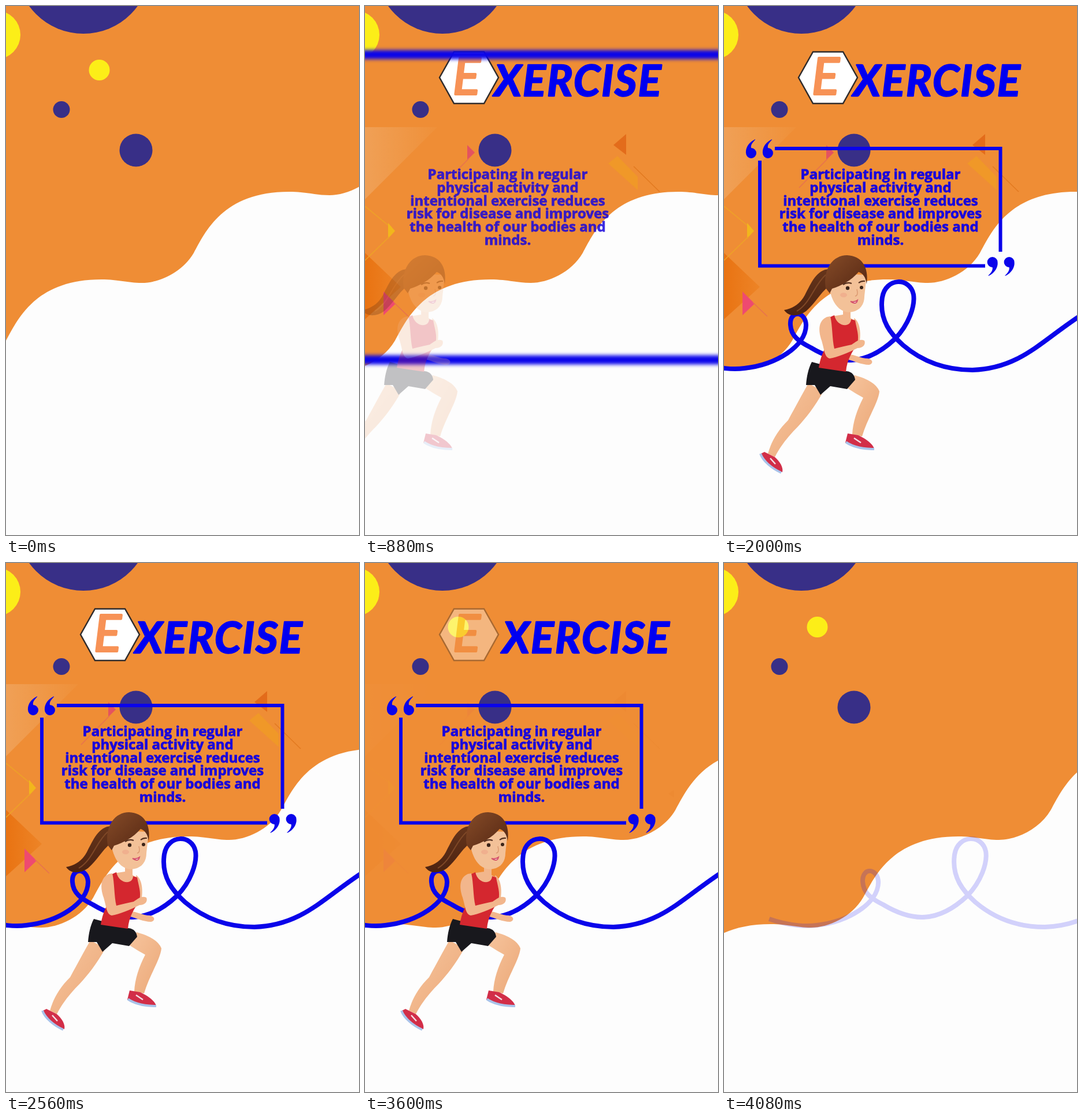
Recreate the animation shown at these times as an HTML page. Size 611 by 917 pixels, loop 4.16 s.

```html
<!DOCTYPE html>
<html lang="en">
<head>
<meta charset="utf-8">
<title>Exercise</title>
<style>
  html, body { margin: 0; width: 100%; height: 100%; overflow: hidden; background: #ef8d35; }
  svg { display: block; width: 100vw; height: 100vh; }
  .title { font: italic 700 74px Lato, sans-serif; letter-spacing: 2.3px; stroke-width: 2.5; stroke-linejoin: round; }
  .initial { font-size: 88px; font-weight: 400; stroke-width: 4; }
  .note { font: 700 24px "Open Sans", sans-serif; text-anchor: middle; fill: #1a08dc; stroke: #1a08dc; stroke-width: .8; }
  .line { fill: none; stroke: #0a04ea; }
  .skin { fill: #f2b68c; }
</style>
</head>
<body>
<svg viewBox="0 0 611 917">
  <defs>
    <linearGradient id="pale"><stop stop-color="#f0a056"/><stop offset="1" stop-color="#ef9039"/></linearGradient>
    <linearGradient id="deep"><stop stop-color="#e97312"/><stop offset="1" stop-color="#ed8427"/></linearGradient>
    <linearGradient id="hair" x2="1" y2="1"><stop stop-color="#854b28"/><stop offset="1" stop-color="#542612"/></linearGradient>
    <linearGradient id="tail" x2="0" y2="1"><stop stop-color="#66351b"/><stop offset="1" stop-color="#4d2311"/></linearGradient>
    <linearGradient id="leg" x2="1" y2="1"><stop stop-color="#f7c59e"/><stop offset="1" stop-color="#eba878"/></linearGradient>
    <g id="quotes" fill="#0a04ea">
      <path id="quote" d="M54 231c-11 5-17 15-16 24a9 9 0 1 0 9-9c-1-5 2-9 7-14z"/>
      <use href="#quote" x="29"/>
    </g>
  </defs>

  <rect width="611" height="917" fill="#ef8d35"/>

  <g id="shapes">
    <path fill="url(#pale)" d="M0 210H125L0 335z"/>
    <path fill="url(#deep)" d="M0 428L62 487L0 543z"/>
    <path fill="#e4535f" d="M177 241l13 13l-13 13z"/>
    <path fill="#ee4a70" d="M32 495l21 21l-21 20z"/>
    <path fill="#e36c1b" d="M452 222v36l-22-17z"/>
    <path fill="#f09828" d="M421 273l16-13l35 36v23z"/>
    <path fill="#f2b61c" d="M40 376l12 14l-12 13z"/>
    <path fill="#e5761e" d="M525 400l10-7v14z"/>
    <g fill="none" stroke-width="1.500">
      <path stroke="#e8714f" d="M180 264L130 315M50 514L75 538"/>
      <path stroke="#e2791f" d="M465 278L510 322"/>
      <path stroke="#eda426" d="M42 400L0 441M0 347L40 380"/>
    </g>
  </g>

  <path id="wave" fill="#fdfdfd"/>

  <g fill="#382f87">
    <circle cx="134" cy="-68" r="116"/>
    <circle cx="96" cy="179.500" r="14.500"/>
    <circle cx="225" cy="250" r="28.500"/>
  </g>
  <g fill="#fcee18">
    <circle cx="-17" cy="50" r="42"/>
    <circle cx="161.500" cy="111" r="18"/>
  </g>

  <g id="badge">
    <path fill="#fff" stroke="#302c2c" stroke-width="2.500" d="M129 124L154 79.500H206L231 124L206 169H154z"/>
    <text class="title initial" x="152" y="153" fill="#f79256" stroke="#f79256">E</text>
  </g>
  <text id="word" class="title" x="224" y="156" fill="#0000f0" stroke="#0000f0">XERCISE</text>

  <g id="frame">
    <path class="line" stroke-width="6" d="M88 247H478.500V426M62 268V450.500H452"/>
    <use href="#quotes"/>
    <use href="#quotes" transform="rotate(180 270.300 349.500)"/>
  </g>

  <text id="note" class="note"></text>

  <path id="ribbon" class="line" stroke-width="8" d="M-47 617C-10 630 20 630 35 628C90 622 142 590 142 553C141 528 113 527 115 553C116 572 130 582 150 592C200 622 245 625 296 577C320 552 331 520 328 500C322 470 280 470 274 505C268 545 290 570 310 588C350 622 395 631 430 631C520 628 555 572 640 522"/>

  <g id="runner">
    <!-- far arm and legs -->
    <path class="skin" d="M213 604C225 603 236 611 249 611C258 613 259 620 251 622C238 622 225 615 211 612z"/>
    <path class="skin" d="M225 541C235 547 237 565 235 580L228 582z"/>
    <path fill="url(#leg)" d="M210 660L226 640C245 645 264 654 269 668C267 688 248 715 239 746L222 743C223 722 230 700 241 679C232 674 222 668 210 660z"/>
    <path fill="url(#leg)" d="M146 654L172 668C157 695 141 715 128 729C112 745 98 762 88 782L76 776C82 755 92 737 111 718C124 694 136 672 146 654z"/>
    <!-- shoes -->
    <path fill="#d22e48" d="M214 741L232 744C243 749 256 757 260 767C245 768 225 767 210 757z"/>
    <path fill="#d22e48" d="M70 773L88 782C96 789 103 799 101 808L93 806C80 798 70 788 64 776z"/>
    <path fill="none" stroke="#a9c3ea" stroke-width="4" d="M211 756C225 766 245 768 260 768M63 776C68 789 82 801 99 809"/>
    <path fill="none" stroke="#f3dfe6" stroke-width="2.500" d="M225 749l12 8M80 784l9 10"/>
    <!-- body -->
    <path fill="#18181d" d="M152 617L212 633C222 634 226 640 227 648L213 664L184 659L167 674L157 657L142 657C143 643 146 628 152 617z"/>
    <path class="skin" d="M186 538L206 535V522H219V541L228 546L222 568H192z"/>
    <path fill="#d4272f" d="M182 540L191 536C195 556 219 559 220 543L227 545C230 562 234 570 231 585C222 600 213 612 211 634L164 627C167 605 176 592 183 575z"/>
    <path class="skin" d="M178 539C163 546 163 562 169 580C174 597 174 609 183 611C196 609 215 601 231 593C240 593 246 587 243 580C235 576 228 582 221 587C210 589 200 592 191 594C187 577 188 555 184 538z"/>
    <!-- head -->
    <path fill="url(#tail)" d="M182 456C160 457 151 480 140 501C132 516 120 524 104 527C112 539 128 539 142 529C160 513 167 496 184 484z"/>
    <path fill="none" stroke="#7f4827" stroke-width="2" d="M176 466C155 485 150 515 126 529"/>
    <path fill="#f3c198" d="M182 484C184 508 196 530 216 531C234 530 243 519 243 503L247 466L195 464z"/>
    <path fill="url(#hair)" d="M176 489C171 455 189 432 213 432C238 433 251 452 247 482C245 470 241 464 233 461C220 476 203 485 187 490L183 498z"/>
    <path fill="none" stroke="#55301e" stroke-width="2.200" d="M206 483Q213 478 221 481M233 480Q238 476 244 477"/>
    <g fill="#3b2418"><circle cx="214" cy="489" r="3.200"/><circle cx="238" cy="488" r="3"/></g>
    <path fill="none" stroke="#dc9a72" stroke-width="1.500" d="M230 491Q233 502 227 503"/>
    <path fill="#fff" stroke="#d4506a" stroke-width="1.800" d="M219 512Q226 514 231 510Q229 519 219 512z"/>
    <ellipse cx="207" cy="501" rx="6" ry="4" fill="#eda084" opacity=".5"/>
  </g>
</svg>
<script>
const LOOP = 4160, STEP = 80;
const el = id => document.getElementById(id);
const clamp = v => Math.max(0, Math.min(1, v));
const ramp = (t, from, to) => clamp((t - from) / (to - from));
const ease = left => Math.max(0, left / 270) ** 2.5;

const step = 'c30 0 45 6 70 6c30 0 70-18 90-52c20-36 50-106 165-106';
el('wave').setAttribute('d', `M-485 778${step.repeat(4)}V917H-485z`);

const lines = ['Participating in regular', 'physical activity and', 'intentional exercise reduces',
  'risk for disease and improves', 'the health of our bodies and', 'minds.'];
el('note').innerHTML = lines.map((s, i) => `<tspan x="271" y="${300 + i * 22.8}">${s}</tspan>`).join('');

function fade(id, opacity) {
  el(id).setAttribute('opacity', opacity);
}

function move(id, transform) {
  el(id).setAttribute('transform', transform);
}

// Slides in from the left until `rest`, slides out to the right after `leave`
function pan(id, t, rest, leave) {
  const away = Math.max(rest - t, t - leave, 0);
  move(id, `translate(${168 * ease(away) * (t < rest ? -1 : 1)})`);
  fade(id, 1 - ramp(away, 100, 270));
}

// Shrinks from a large size onto its place around (x, y)
function zoom(id, t, rest, x, y) {
  const extra = 1.6 * ease(rest - t);
  move(id, `translate(${x} ${y}) scale(${1 + extra}) translate(${-x} ${-y})`);
  el(id).style.filter = extra > 0.01 ? `blur(${0.75 * extra}px)` : 'none';
}

function draw(t) {
  move('wave', `translate(${t * 0.059})`);
  fade('shapes', ramp(t, 300, 560) * (1 - ramp(t, 3440, 3620)));
  zoom('badge', t, 700, 180, 124);
  fade('badge', ramp(t, 430, 600) * (1 - ramp(t, 3460, 3680)));
  pan('word', t, 800, 3500);
  zoom('frame', t, 1150, 270.5, 348.7);
  fade('frame', ramp(t, 640, 720) * (1 - ramp(t, 3620, 3845)));
  pan('note', t, 1004, 3652);
  pan('runner', t, 1107, 3760);
  pan('ribbon', t, 1210, 3840);
}

const start = performance.now();
function tick() {
  const t = (performance.now() - start) % LOOP;
  draw(Math.floor(t / STEP) * STEP);
  requestAnimationFrame(tick);
}
tick();
</script>
</body>
</html>
```
